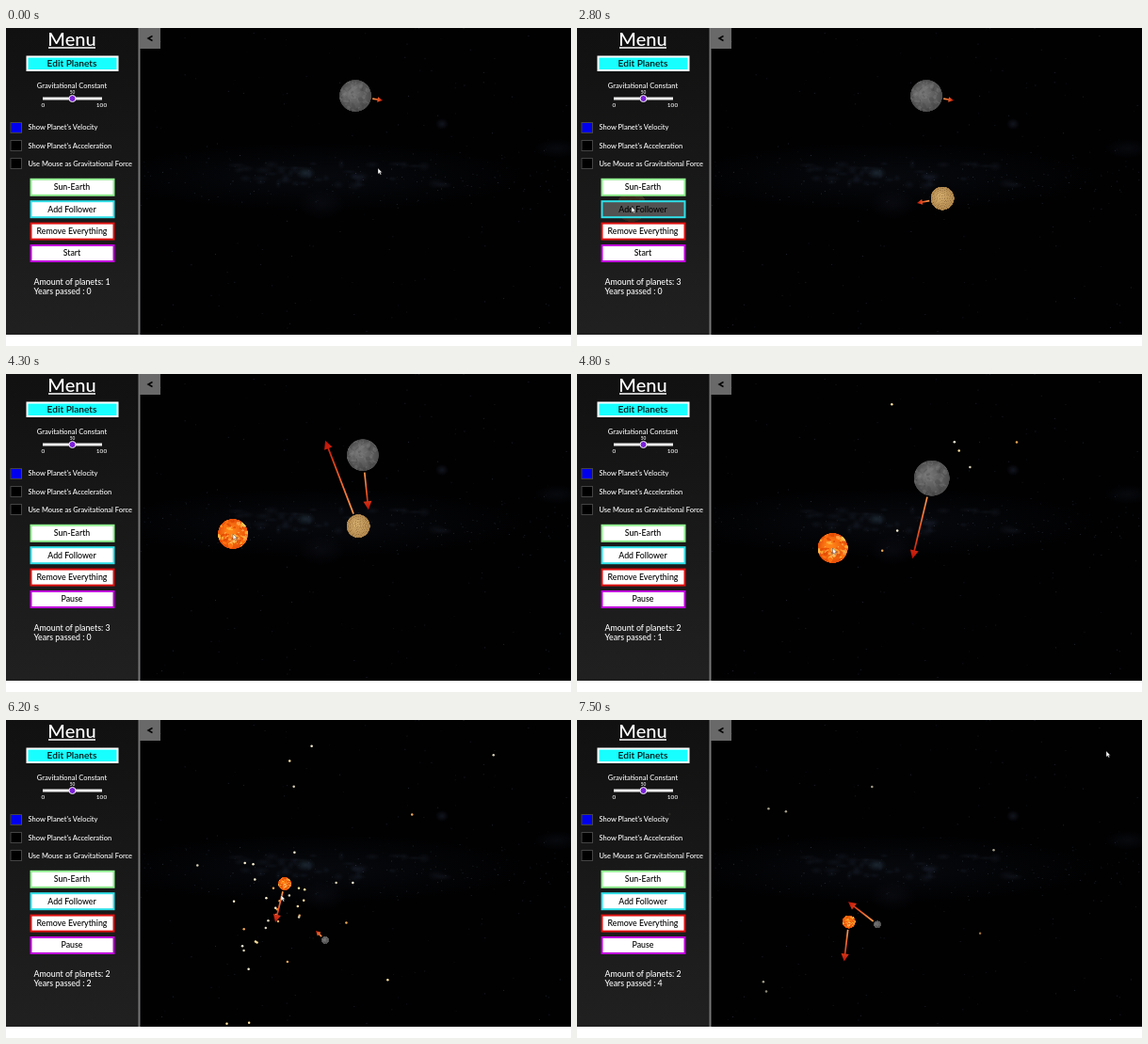
Write an HTML page with a canvas that moves like this. It is 600 px wide and 338 px high and loops after 7600 ms.

```html
<!DOCTYPE html>
<html lang="en">
<head>
<meta charset="utf-8">
<title>Planet sandbox</title>
<style>
  html, body { margin: 0; width: 100%; height: 100%; overflow: hidden; background: #fff; }
  canvas, svg { position: absolute; left: 0; top: 0; }
  text { font-family: Lato, Inter, sans-serif; font-weight: 500; fill: #fff; }
  .mid { text-anchor: middle; }
  .button rect { fill: #fff; stroke-width: 2; }
  .button text { fill: #000; font-size: 8.8px; }
  .button.hover rect { fill: #555; fill-opacity: .94; }
  .small { font-size: 7.5px; }
  .stat { font-size: 8.8px; }
</style>
</head>
<body>
<canvas id="space" width="600" height="326"></canvas>
<svg width="600" height="338" viewBox="0 0 600 338">
  <defs>
    <linearGradient id="shade" x2="0" y2="1">
      <stop stop-color="#131313"/><stop offset="1" stop-color="#252525"/>
    </linearGradient>
  </defs>
  <rect width="141" height="326" fill="url(#shade)" fill-opacity=".87"/>
  <rect x="140.5" width="2" height="326" fill="#777"/>
  <rect x="142" width="22" height="22" fill="#696969"/>
  <path d="M155.500 8.500 151 11l4.500 2.500" fill="none" stroke="#000" stroke-width="1.500"/>
  <text class="mid" x="70" y="18.500" font-size="20">Menu</text>
  <path d="M45 21H95" stroke="#fff" stroke-width="1.300"/>
  <rect x="22.500" y="30.500" width="96" height="14.500" fill="#18ffff" stroke="#fff" stroke-width="2"/>
  <text class="mid" x="70" y="41.200" font-size="10.200" style="fill:#000">Edit Planets</text>
  <text class="mid small" x="70" y="63.500">Gravitational Constant</text>
  <text class="mid" x="70.500" y="69.500" font-size="4.800">50</text>
  <path d="M39 75H102" stroke="#eee" stroke-width="3"/>
  <circle cx="70.500" cy="75" r="3.500" fill="#7b20d8" stroke="#eee"/>
  <g class="mid" font-size="6.500"><text x="39.500" y="84">0</text><text x="101.500" y="84">100</text></g>
  <g id="checks"></g>
  <g id="buttons"></g>
  <text class="stat" id="count" x="29.500" y="272.500"></text>
  <text class="stat" id="years" x="29.500" y="283"></text>
  <path id="cursor" d="M0 0V6.200L1.500 4.900 2.600 7 3.600 6.500 2.600 4.500H4.400Z" fill="#fff" stroke="#222" stroke-width=".4"/>
</svg>
<script>
const LOOP = 7600, STEP = 100;
const PLACE = 300, FOLLOW = 2600, START = 3700, CRASH = 4500, BURST = 5500, ORBIT = 6200;
const $ = id => document.getElementById(id);
const ctx = $('space').getContext('2d');

let seed = 7;
const rnd = () => (seed = seed * 16807 % 2147483647) / 2147483647;
const mix = (a, b, u) => a + (b - a) * u;
const ease = (t, from, to) => {
  const u = Math.min(1, Math.max(0, (t - from) / (to - from)));
  return u * u * (3 - 2 * u);
};

// Menu
$('checks').innerHTML = ["Show Planet's Velocity", "Show Planet's Acceleration", 'Use Mouse as Gravitational Force']
  .map((label, i) => `<rect x="5" y="${100.5 + 19 * i}" width="11.500" height="11" fill="${i ? '#000' : '#0000ee'}" stroke="#444"/>
    <text class="small" x="23.500" y="${108.3 + 19.2 * i}">${label}</text>`).join('');
$('buttons').innerHTML = [['Sun-Earth', '#90ee90'], ['Add Follower', '#30e0e8'], ['Remove Everything', '#e01010'], ['Start', '#c000dc']]
  .map(([label, color], i) => `<g class="button"><rect x="26.500" y="${160.8 + 23.4 * i}" width="88" height="17" stroke="${color}"/>
    <text class="mid" x="70" y="${172.2 + 23.4 * i}">${label}</text></g>`).join('');
const buttons = [...document.querySelectorAll('.button')];
const startLabel = buttons[3].querySelector('text');

function layer(w, h, paint) {
  const c = document.createElement('canvas');
  c.width = w; c.height = h;
  paint(c.getContext('2d'));
  return c;
}

const sky = layer(600, 326, g => {
  g.fillStyle = '#010102';
  g.fillRect(0, 0, 600, 326);
  const glow = (x, y, rx, ry, color, alpha) => {
    g.save();
    g.translate(x, y);
    g.scale(rx, ry);
    const fade = g.createRadialGradient(0, 0, 0, 0, 0, 1);
    fade.addColorStop(0, `rgba(${color},${alpha})`);
    fade.addColorStop(1, `rgba(${color},0)`);
    g.fillStyle = fade;
    g.fillRect(-1, -1, 2, 2);
    g.restore();
  };
  glow(330, 158, 220, 36, '20,28,42', .28);
  glow(318, 154, 11, 7, '75,105,130', .3);
  glow(335, 187, 25, 16, '35,40,62', .18);
  glow(463, 102, 7, 6, '55,65,95', .3);
  glow(585, 128, 24, 10, '42,55,80', .15);
  for (let i = 0; i < 40; i++)
    glow(320 + (rnd() + rnd() - 1) * 170, 156 + (rnd() - .5) * 24, 3 + rnd() * 8, 2 + rnd() * 4, '60,74,104', .14);
  for (let i = 0; i < 430; i++) {
    const x = rnd() * 600, y = i < 200 ? 158 + (rnd() + rnd() - 1) * 34 : rnd() * 326;
    g.fillStyle = `rgba(130,150,180,${.06 + rnd() * .25})`;
    g.fillRect(x, y, .9, .9);
  }
});

const R = 48;
const globe = (light, dark, detail) => layer(2 * R, 2 * R, g => {
  g.translate(R, R);
  g.arc(0, 0, R, 0, 7);
  g.clip();
  const fill = g.createRadialGradient(-10, -10, 8, 0, 0, R);
  fill.addColorStop(0, light);
  fill.addColorStop(1, dark);
  g.fillStyle = fill;
  g.fillRect(-R, -R, 2 * R, 2 * R);
  detail(g);
});
const blotches = (n, size, colors) => g => {
  for (let i = 0; i < n; i++) {
    g.beginPath();
    g.ellipse((rnd() * 2 - 1) * R, (rnd() * 2 - 1) * R, 2 + rnd() * size, 2 + rnd() * size * .7, rnd() * 3, 0, 7);
    g.fillStyle = colors[i % colors.length];
    g.fill();
  }
};
const moonSkin = globe('#727272', '#4c4c4c', blotches(70, 8, ['#8884', '#3c3c3c44', '#9992']));
const sunSkin = globe('#ff8418', '#e85008', blotches(70, 9, ['#ffc040aa', '#e04400aa', '#ffe89066', '#ff7010']));
const tanSkin = globe('#d3ac6c', '#b48b50', g => {
  g.lineWidth = 2;
  g.strokeStyle = '#77542c99';
  g.setLineDash([4, 3]);
  for (let r = 4; r < R; r += 6) {
    g.beginPath();
    g.arc(0, 0, r, 0, 7);
    g.stroke();
  }
});

// Bodies move under constant acceleration; the arrow shows the velocity
const body = (at, r, [x, y], [vx, vy], [ax, ay]) => t => {
  const s = (t - at) / 600, move = (v, a) => .45 * (v * s + a * s * s / 2);
  return { x: x + move(vx, ax), y: y + move(vy, ay), r, vx: vx + ax * s, vy: vy + ay * s };
};
const moonFall = body(START, 17, [371, 72], [29, 5], [-23, 53]);
const tanFall = body(START, 12.5, [388, 181], [-27, 5], [-8, -96]);
const moonMerged = body(CRASH, 19, [379, 95], [0, 54], [-41, 63]);
const moonOrbit = body(ORBIT, 4, [339, 234], [-10, -10], [-9.7, -6.5]);
const sunOrbit = body(ORBIT, 7, [296, 174], [-10, 41], [2.3, .5]);

function blend(a, b, u) {
  const out = {};
  for (const key in a) out[key] = mix(a[key], b[key], u);
  return out;
}

// Pointer: rest point, then moves of [from, to, x, y]
const moves = [[0, PLACE, 388, 181], [500, 1000, 361, 187], [1500, FOLLOW, 58, 190], [2900, 3300, 70, 238],
  [START, 4300, 241, 170], [4300, 5300, 302, 200], [5400, ORBIT, 292, 186], [ORBIT, 7500, 562, 33]];
const pointer = t => moves.reduce(([x, y], [from, to, nx, ny]) => {
  const u = ease(t, from, to);
  return [mix(x, nx, u), mix(y, ny, u)];
}, [395, 149]);

// Debris flies out from each crash; the closest pieces fall back and vanish
const scatter = (n, at, x, y, near, far, span) => Array.from({ length: n }, (_, i) => {
  const reach = near + far * rnd() ** 2.2;
  return { at, x, y, reach, angle: rnd() * 6.283, end: reach < 60 ? at + span * (.6 + rnd() * .4) : LOOP, tint: i % 4 };
});
const debris = [...scatter(7, CRASH, 375, 125, 90, 130, 1200), ...scatter(38, BURST, 300, 205, 12, 170, 1800)];
const tints = ['#ffe5a0', '#fff5d6', '#eda955', '#d9d2b8'];

function dot({ at, x, y, reach, angle, end, tint }, t) {
  if (t < at || t >= end) return;
  const out = reach * ((t - at) / 700) ** .7;
  ctx.globalAlpha = mix(1, .65, ease(t, ORBIT, 7000));
  ctx.fillStyle = tints[tint];
  ctx.beginPath();
  ctx.arc(x + out * Math.cos(angle), y + out * Math.sin(angle), 1.25, 0, 7);
  ctx.fill();
  ctx.globalAlpha = 1;
}

function planet(skin, { x, y, r }) {
  ctx.drawImage(skin, x - r, y - r, 2 * r, 2 * r);
}

function arrow({ x, y, r, vx, vy }) {
  const length = Math.hypot(vx, vy), from = r + 1.5;
  if (length < from + 2) return;
  const head = Math.min(9, 4 + (length - r) * .12);
  ctx.save();
  ctx.translate(x, y);
  ctx.rotate(Math.atan2(vy, vx));
  const fade = ctx.createLinearGradient(from, 0, length, 0);
  fade.addColorStop(0, '#ff9a50');
  fade.addColorStop(.6, '#e65020');
  fade.addColorStop(1, '#bd1008');
  ctx.strokeStyle = ctx.fillStyle = fade;
  ctx.lineWidth = 1.7;
  ctx.beginPath();
  ctx.moveTo(from, 0);
  ctx.lineTo(length - head / 2, 0);
  ctx.stroke();
  ctx.beginPath();
  ctx.moveTo(length, 0);
  ctx.lineTo(length - head, -head / 2);
  ctx.lineTo(length - head, head / 2);
  ctx.fill();
  ctx.restore();
}

function draw(t) {
  const [mx, my] = pointer(t), run = Math.max(t, START), zoom = ease(t, 5550, 5900);
  const moon = blend(run < CRASH ? moonFall(run) : moonMerged(run), moonOrbit(t), zoom);
  const sun = blend({ x: mx, y: my, r: 16, vx: 0, vy: 0 }, sunOrbit(t), zoom);
  const tan = tanFall(run), pull = ease(t, PLACE, 1000);
  tan.vx *= pull;
  tan.vy *= pull;

  ctx.drawImage(sky, 0, 0);
  debris.forEach(d => dot(d, t));
  planet(moonSkin, moon);
  arrow(moon);
  if (t >= PLACE && t < CRASH) {
    planet(tanSkin, tan);
    arrow(tan);
  }
  if (t >= FOLLOW) {
    planet(sunSkin, sun);
    arrow(sun);
  }

  const count = 1 + (t >= PLACE) + (t >= FOLLOW) - (t >= CRASH);
  $('count').textContent = 'Amount of planets: ' + count;
  $('years').textContent = 'Years passed : ' + Math.floor((run - START) / 900);
  startLabel.textContent = t < START ? 'Start' : 'Pause';
  buttons.forEach((b, i) => {
    const top = 160 + 23.4 * i;
    b.classList.toggle('hover', mx > 26 && mx < 115 && my > top && my < top + 19);
  });
  $('cursor').setAttribute('transform', `translate(${mx} ${my})`);
}

function frame() {
  draw(Math.floor(performance.now() % LOOP / STEP) * STEP);
  requestAnimationFrame(frame);
}
frame();
</script>
</body>
</html>
```
